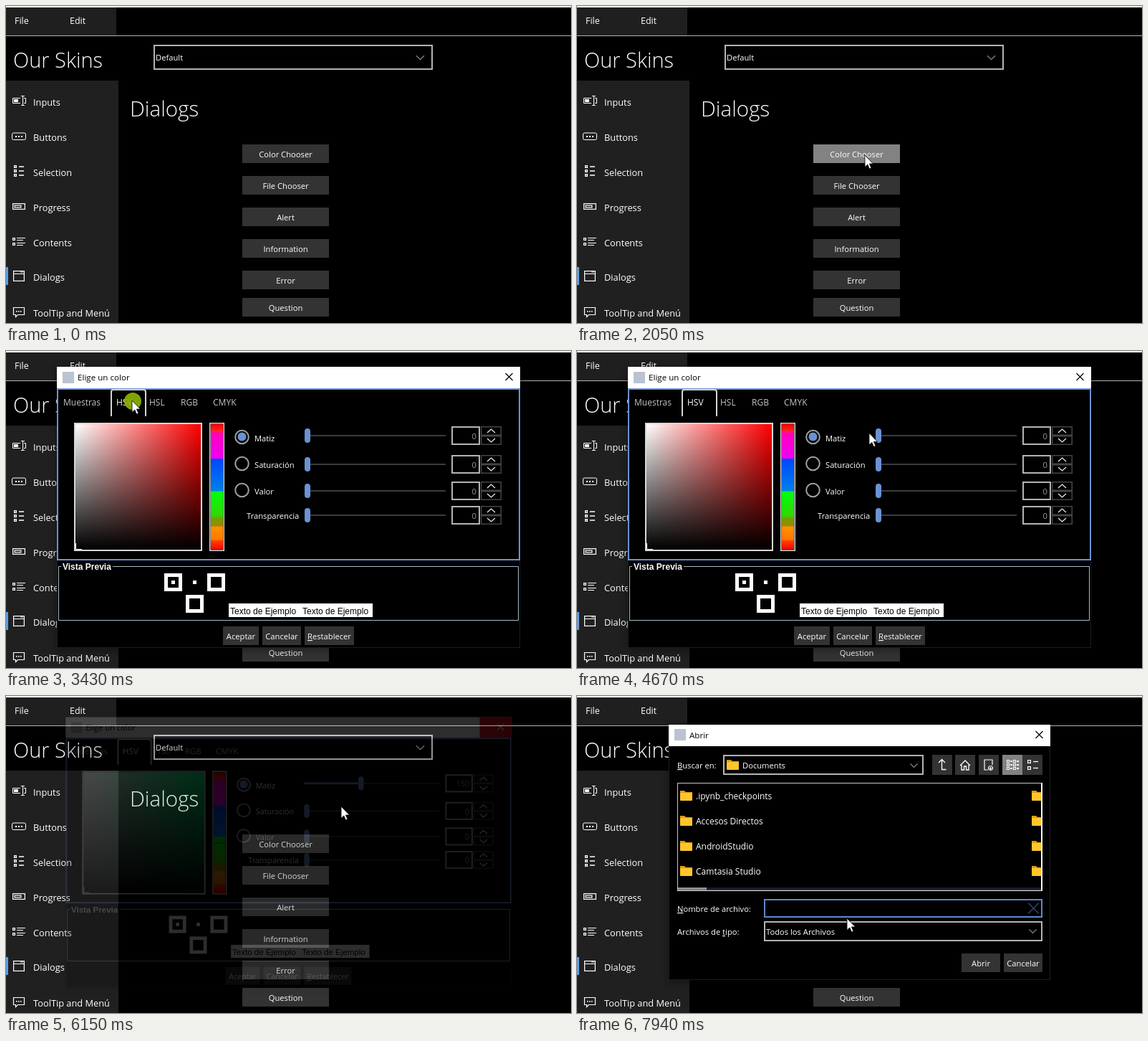
Animation of 789 by 442 pixels, one loop 8 s. Source, as an HTML page:

```html
<!DOCTYPE html>
<html lang="en">
<head>
<meta charset="utf-8">
<title>Dialogs demo</title>
<style>
html, body { margin: 0; width: 100%; height: 100%; overflow: hidden; background: #000; }
svg { display: block; font-family: "Open Sans", "Noto Sans", sans-serif; fill: #fff; }
text { white-space: pre; }
.arial { font-family: "Liberation Sans", Arial, sans-serif; }
.shadow { filter: drop-shadow(0 3px 6px rgba(0, 0, 0, .4)); }
</style>
</head>
<body>
<svg id="stage" width="789" height="442" viewBox="0 0 789 442"></svg>
<script>
const LOOP = 8000, STEP = 71.67;
const BLUE = '#6a92d4', GREY = '#b4b4b4', DARK = '#333';

// Drawing helpers, each returns SVG markup
const rect = (x, y, w, h, fill, more = '') =>
  `<rect x="${x}" y="${y}" width="${w}" height="${h}" fill="${fill}" ${more}/>`;
const frame = (x, y, w, h, color, lw = 2, fill = 'none') =>
  rect(x + lw / 2, y + lw / 2, w - lw, h - lw, fill, `stroke="${color}" stroke-width="${lw}"`);
const line = (d, color = '#fff', lw = 1, more = '') =>
  `<path d="${d}" fill="none" stroke="${color}" stroke-width="${lw}" ${more}/>`;
const text = (x, y, s, size = 11.2, more = '') =>
  `<text x="${x}" y="${y}" font-size="${size}" ${more}>${
    s.replace(/_(.)/, '<tspan text-decoration="underline">$1</tspan>')}</text>`;
const button = (x, y, w, label, id = '') =>
  rect(x, y, w, 26, DARK, id && `id="${id}"`) +
  text(x + w / 2, y + 18, label, 11.2, 'text-anchor="middle"');
const chevron = (x, y, color, r = 5, id = '') =>
  line(`M${x - r} ${y - r / 2}l${r} ${r}l${r} ${-r}`, color, 1.2, id && `id="${id}"`);
const cross = (x, y, r, color, more = '') =>
  line(`M${x - r} ${y - r}l${2 * r} ${2 * r}m0 ${-2 * r}l${-2 * r} ${2 * r}`, color, 1.2, more);
const folder = (x, y) =>
  `<path d="M${x} ${y}h6l2 2h9v4h-17z" fill="#e39b0c"/>` + rect(x, y + 3, 17, 11, '#ffc52b', 'rx="1"');
const gradient = (id, stops, down) =>
  `<linearGradient id="${id}" x2="${down ? 0 : 1}" y2="${down ? 1 : 0}">${stops.map(([o, c, a = 1]) =>
    `<stop offset="${o}" stop-color="${c}" stop-opacity="${a}"/>`).join('')}</linearGradient>`;
const group = (id, body, more = '') => `<g id="${id}" ${more}>${body}</g>`;
const each = (list, f) => list.map(f).join('');

const defs = '<defs>' +
  gradient('whiten', [[0, '#fff'], [1, '#fff', 0]]) +
  gradient('darken', [[0, '#000', 0], [1, '#000']], true) +
  gradient('trail', [[0, '#a0a0a0'], [.45, '#8fa0a8'], [.75, '#6fb0a8'], [1, '#88a8e8']]) +
  gradient('hues', [[0, '#f00'], [.06, '#ff2828'], [.07, '#ff00c0'], [.27, '#f000f0'], [.28, '#0048ff'],
    [.53, '#0080e8'], [.54, '#00ff10'], [.73, '#30d800'], [.75, '#70a000'], [.81, '#a08800'],
    [.82, '#ff9000'], [.92, '#ff7800'], [.93, '#ff4000'], [1, '#f00']], true) +
  '<clipPath id="list"><path d="M141 122H648V267H141z"/></clipPath></defs>';

// Main window
const items = ['Inputs', 'Buttons', 'Selection', 'Progress', 'Contents', 'Dialogs', 'ToolTip and Menú'];
const itemY = [134, 183, 232, 281, 330, 378, 428];
const icons =
  line('M20 128.5H9.5v7H20M23.5 125v14M21 125.5h5M21 138.5h5M25 128.5h2.5v7H25') + rect(11, 130, 6, 4, '#fff') +
  rect(8.5, 177, 19, 9.5, 'none', 'rx="2" stroke="#fff"') + each([13, 17, 21], x => rect(x, 181, 2, 2, '#fff')) +
  each([224, 230, 236], y => frame(11, y - 2, 4, 4, '#fff', 1.3) + line(`M18 ${y}h7`, '#fff', 1.5)) +
  frame(9, 275, 18, 9, '#fff', 1.2) + frame(11.5, 277.5, 10, 4, '#fff', 1.2) +
  each([324, 331], y => frame(9, y - 1, 4, 4, '#fff', 1.2) + line(`M15 ${y - .5}h12M15 ${y + 2.5}h9`)) +
  frame(10, 369, 16, 15, '#fff', 1.2) + line('M10 373.5h16M20 371h4', '#fff', 1.2) +
  line('M10.5 420.5h15v10h-9l-3 3v-3h-3z', '#fff', 1.2) + each([14, 17, 20], x => rect(x, 425, 1.6, 1.6, '#fff'));
const names = ['Color Chooser', 'File Chooser', 'Alert', 'Information', 'Error', 'Question'];
const nameY = [193, 237, 281, 325, 369, 407];

const main = rect(0, 0, 789, 442, '#000') + rect(0, 0, 789, 2, '#fff') +
  rect(0, 2, 154, 39, '#1f1f1f') + rect(0, 41, 789, 1, GREY) +
  text(12, 25, 'File', 12.5) + text(89, 25, 'Edit', 12.5) +
  text(10, 86, 'Our Skins', 29, 'font-weight="300"') +
  frame(206, 54, 390, 35, GREY) + text(209, 76, 'Default') + chevron(578.5, 72, '#888', 5.5, 'arrow') +
  rect(0, 104, 157, 338, '#202020') + rect(0, 364, 3, 25, '#5a9be6') + icons +
  each(items, (s, i) => text(38, itemY[i] + 5, s, 12.8)) +
  text(173, 154, 'Dialogs', 29.5, 'font-weight="300"') +
  each(names, (s, i) => button(330, nameY[i], 121, s, 'btn' + i));

// Shared window chrome
const chrome = (x, y, w, h, title, iconY, id) =>
  rect(x, y, w, h, '#000', 'class="shadow"') + frame(x, y, w, h, '#1c1c1c', 1) + rect(x, y, w, 30, '#fff') +
  rect(x + 8, iconY, 16, 16, '#b9c4d0') + text(x + 29, y + 19, title, 11.6, 'fill="#000"') +
  rect(x + w - 46, y, 46, 30, '#e81123', `id="${id}Red" display="none"`) +
  cross(x + w - 15.5, y + 14, 5, '#000', `id="${id}X"`);

// Color dialog
const swatches = each([...Array(279).keys()], i => {
  const c = i % 31, r = (i - c) / 31;
  const color = c ? `hsl(${(168 + 12 * c) % 360},100%,${90 - 10 * r}%)` : `hsl(0,0%,${100 - 12.5 * r}%)`;
  return rect(184 + 11 * c, 145 + 11 * r, 10, 10, color);
}) + text(536, 140, 'Reciente:') +
  each([...Array(35).keys()], i => rect(536 + 11 * (i % 5), 146 + 11 * (i / 5 | 0), 10, 10, '#555'));

const rows = [['Matiz', 118, 125.5], ['Saturación', 158, 163], ['Valor', 195, 200], ['Transparencia', 229, 234]];
const sliders = each(rows, ([label, y, base], i) =>
  (i < 3 ? `<circle cx="329.5" cy="${120 + 37 * i}" r="9.3" fill="none" stroke="#a0a0a0" stroke-width="2"/>` : '') +
  text(i < 3 ? 347 : 336, base, label) + rect(417, y - 1, 197, 2, '#3c3c3c') +
  (i ? '' : rect(417, y - 1.5, 1, 3, BLUE, 'id="fill"')) +
  rect(417, y - 10, 8, 20, BLUE, `rx="4" ${i ? '' : 'id="thumb"'}`) +
  frame(622, y - 13, 40, 26, GREY) +
  text(657, y + 4.5, '0', 11.2, `text-anchor="end" fill="#a0a0a0" ${i ? '' : 'id="value"'}`) +
  frame(663, y - 13, 29, 13, '#444', 1.5) + frame(663, y, 29, 13, '#444', 1.5) +
  line(`M672 ${y - 4}l5.5 -5l5.5 5M672 ${y + 4}l5.5 5l5.5 -5`, '#eee', 1.2));
const hsv = frame(95, 100, 179, 179, '#d8d8d8') + rect(97, 102, 175, 175, 'red', 'id="pane"') +
  rect(97, 102, 175, 175, 'url(#whiten)') + rect(97, 102, 175, 175, 'url(#darken)') +
  line('M97.5 268v8.5H106') +
  frame(284, 100, 21, 179, '#d8d8d8', 1.5) + rect(286, 102, 17, 175, 'url(#hues)') +
  rect(286, 276, 17, 1, '#1a5030', 'id="mark"') +
  sliders + `<circle id="dot" cx="329.5" cy="119.5" r="6"/>`;
const ring = (x, y) => frame(x, y, 25, 25, '#fff', 5);
const preview = line('M77 300.5H73.5V375.5H715.5V300.5H149', '#a8bccb') +
  text(79, 305, 'Vista Previa', 12, 'class="arial" font-weight="700"') +
  ring(221, 310) + rect(231, 320, 5, 5, '#fff') + rect(261, 320, 5, 5, '#fff') + ring(281, 310) + ring(251, 340) +
  rect(311, 352, 201, 19, '#fff') +
  each([313, 414], x => text(x, 367, 'Texto de Ejemplo', 12, 'class="arial" fill="#000"'));
const tabs = [['Muestras', 80], ['HSV', 154], ['HSL', 200], ['RGB', 244], ['CMYK', 289]];
const colors = chrome(71, 22, 647, 392, 'Elige un color', 29, 'c') +
  frame(71, 52, 647, 240, BLUE) +
  each(tabs, ([s, x], i) => text(x, 76, s, 12, `id="tab${i}" fill="#c4c4c4"`)) +
  line('', '#d4d4d4', 2, 'id="outline"') +
  group('swatches', swatches) + group('hsv', hsv) + preview +
  button(303, 384, 50, 'Aceptar') + button(358, 384, 54, 'Cancelar') + button(417, 384, 69, '_Restablecer');

// File dialog
const tools = each([496, 528, 561, 594, 622], (x, i) => rect(x, 82, 28, 28, i == 3 ? '#828282' : DARK)) +
  line('M505 93l4.5-4.5l4.5 4.5M509.5 89v13.5h6', '#fff', 1.3) +
  line('M535 97l7-7l7 7M537 96v7h3.5v-5h3v5h3.5v-7', '#fff', 1.3) +
  line('M574 103h-5V89h11v7M577.5 97.5a3 3 0 1 0 .1 0M577.5 99v4M575.5 101h4', '#fff', 1.2) +
  each([91, 96, 101], y => each([600, 609], x => frame(x, y - 2, 4, 4, '#fff', 1) + rect(x + 5, y - 1, 3, 2, '#fff'))) +
  each([91, 100], y => frame(629, y - 2, 5, 5, '#fff', 1.2) + line(`M637 ${y + .5}h7`, '#fff', 1.3));
const folders = each(['.ipynb_checkpoints', 'Accesos Directos', 'AndroidStudio', 'Camtasia Studio'], (s, i) =>
  folder(144, 132 + 35 * i) + folder(635, 132 + 35 * i) +
  text(166, 144 + 35 * i, s.replace('_', '&#95;'), 12));
const files = chrome(128, 40, 533, 356, 'Abrir', 46, 'f') +
  text(140, 101, '_Buscar en:') + frame(204, 82, 280, 28, GREY) + folder(209, 89) +
  text(231, 101, 'Documents') + chevron(470.5, 97, '#888') + tools +
  frame(140, 121, 510, 151, '#c8c8c8', 1) + rect(648, 121, 2, 151, '#fff') + rect(140, 270.5, 510, 1.5, '#ddd') +
  `<g clip-path="url(#list)">${folders}</g>` + rect(141, 267, 507, 3.5, '#1a1a2a') + rect(141, 267, 40, 3.5, '#909090') +
  text(140, 301, '_Nombre de archivo:') + frame(261, 283, 389, 26, '#5f88cc') +
  rect(266, 288, 1, 16, '#fff', 'id="caret"') + cross(637.5, 296, 7.5, '#2f4a7c', 'id="clear"') +
  text(140, 333, 'Archivos de _tipo:') + frame(261, 314, 389, 28, GREY) +
  text(264, 333, 'Todos los Archivos') + chevron(636.5, 328, '#888') +
  button(537, 359, 54, 'Abrir') + button(596, 359, 54, 'Cancelar');

const pointer = '<circle id="halo" r="12" cx="1" cy="1" fill="#8ab000" fill-opacity=".93"/>' +
  '<path d="M0 0V16.5L3.8 13L6.4 19L9 18L6.4 12H11.6z" stroke="#000" stroke-width=".8"/>';

document.getElementById('stage').innerHTML =
  defs + main + group('colors', colors) + group('files', files) + group('pointer', pointer);

// Animation
const $ = id => document.getElementById(id);
const set = (id, attrs) => { for (const k in attrs) $(id).setAttribute(k, attrs[k]); };
const show = (id, on) => set(id, { display: on ? 'inline' : 'none' });
const clamp = v => Math.min(1, Math.max(0, v));
const within = (t, a, b) => t >= a && t < b;

// Pointer track: time, x, y
const track = [[200, 714, 428], [600, 560, 330], [970, 436, 297], [1040, 436, 297], [1700, 402, 208],
  [2600, 402, 208], [3350, 176, 69], [3430, 176, 69], [3850, 201, 69], [4000, 201, 70], [4750, 420, 117],
  [4860, 420, 117], [5100, 500, 118], [5217, 638, 99], [5500, 716, 32], [5660, 716, 28], [5800, 716, 28],
  [6149, 468, 154], [6490, 392, 212], [6560, 392, 214], [6770, 387, 247], [7600, 387, 247], [7930, 377, 310]];
const clicks = [[1740, 1870], [3340, 3600], [4790, 5110], [5730, 5870], [6770, 6920]];

function pointerAt(t) {
  let i = 0;
  while (i < track.length - 2 && t > track[i + 1][0]) i++;
  const [a, x0, y0] = track[i], [b, x1, y1] = track[i + 1];
  const p = clamp((t - a) / (b - a)), e = p * p * (3 - 2 * p);
  return [x0 + (x1 - x0) * e, y0 + (y1 - y0) * e];
}

function pose(id, cx, cy, scale, alpha) {
  show(id, alpha > 0);
  set(id, { opacity: alpha, transform: `translate(${cx} ${cy}) scale(${scale}) translate(${-cx} ${-cy})` });
}

function draw(t) {
  const s = 200 + STEP * Math.floor((t - 190) / STEP);
  const [x, y] = pointerAt(s);
  show('pointer', t >= 200);
  set('pointer', { transform: `translate(${x} ${y})` });
  show('halo', clicks.some(([a, b]) => within(t, a, b)));
  nameY.forEach((top, i) => set('btn' + i, {
    fill: t >= 200 && within(x, 330, 451) && within(y, top, top + 26) ? '#828282' : DARK }));
  set('arrow', { stroke: t > 6300 ? '#5a94c0' : '#888' });

  const open = clamp((s - 2063) / 260), close = clamp((s - 5934) / 260);
  pose('colors', 394.5, 218, close ? 1 - .046 * close : 1 - .08 * (1 - open) ** 2, open * (1 - close));
  const pick = t >= 3360;
  show('swatches', !pick);
  show('hsv', pick);
  set('outline', { d: pick ? 'M147 91V57q0-3 3-3H192q3 0 3 3V91' : 'M74 91V57q0-3 3-3H143q3 0 3 3V91' });
  set('tab0', { fill: pick ? '#c4c4c4' : '#fff' });
  set('tab1', { fill: pick ? '#fff' : '#c4c4c4' });

  const hue = t < 4800 ? 0 : Math.round(150 * clamp((s > 5100 ? 500 : x) / 80 - 5.25));
  const shift = hue * .525, busy = within(t, 4880, 5730);
  set('pane', { fill: `hsl(${hue},100%,50%)` });
  set('mark', { y: Math.min(276, 277 - 175 * hue / 360) });
  set('thumb', { x: 417 + shift });
  set('fill', { width: shift, fill: busy ? 'url(#trail)' : BLUE });
  $('value').textContent = hue;
  set('dot', { fill: busy ? '#8c8c8c' : BLUE });
  const exit = t > 5300 && x > 672 && y < 52 || t > 5700;
  show('cRed', exit);
  set('cX', { stroke: exit ? '#fff' : '#000' });

  const open2 = clamp((s - 7223) / 240);
  pose('files', 394.5, 218, 1 - .08 * (1 - open2) ** 2, open2);
  show('caret', t < 7800);
  show('clear', t >= 7660);
}

function tick() {
  draw(performance.now() % LOOP);
  requestAnimationFrame(tick);
}
tick();
</script>
</body>
</html>
```
